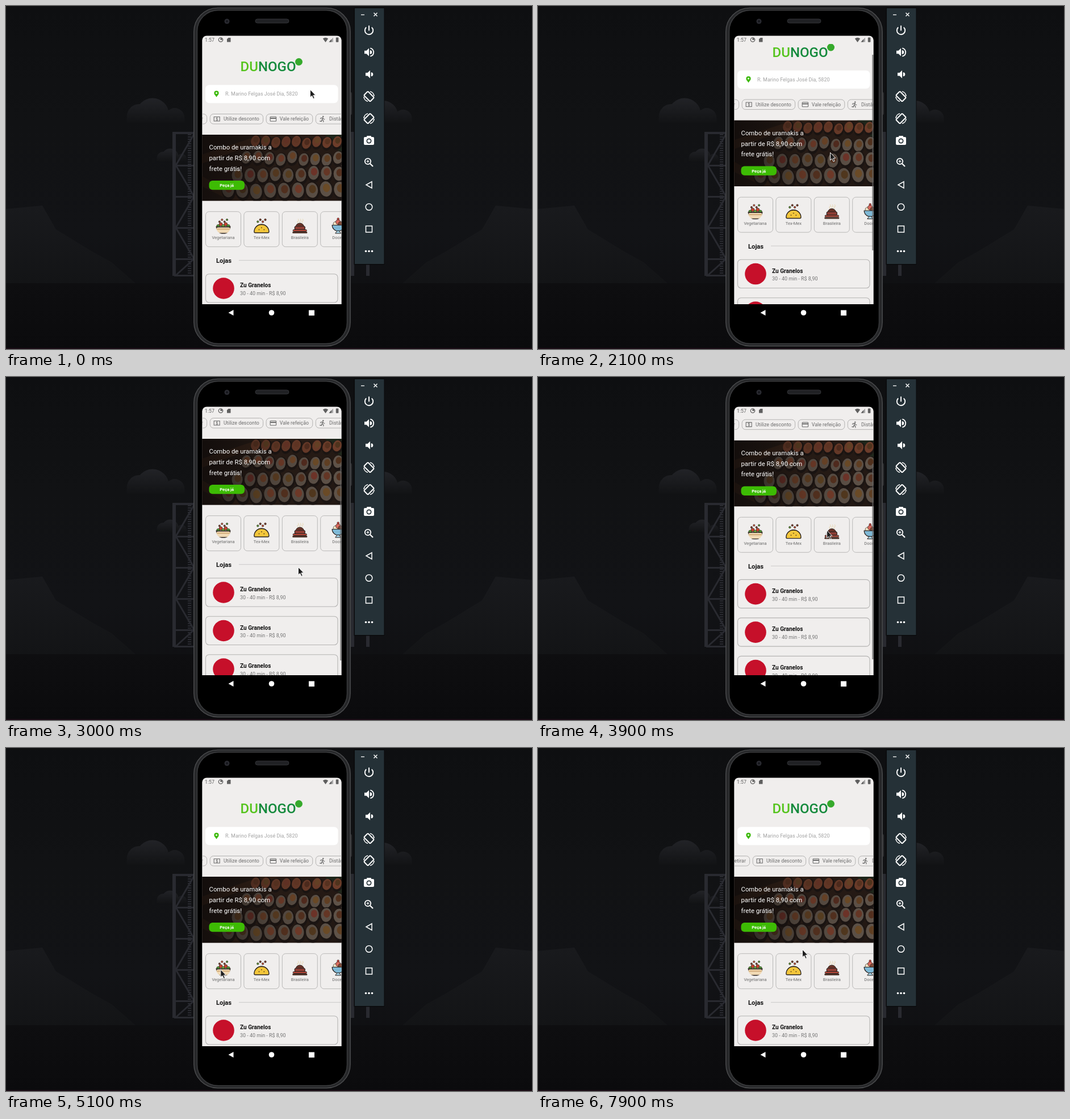
Write an HTML page with a canvas that moves like this. It is 926 px wide and 605 px high and loops after 8 s.

```html
<!DOCTYPE html>
<html lang="pt-BR">
<head>
<meta charset="utf-8">
<title>App de entregas</title>
<style>
html, body { margin: 0; width: 100%; height: 100%; overflow: hidden; background: #0f1012; }
canvas { display: block; }
</style>
</head>
<body>
<canvas id="stage" width="926" height="605"></canvas>
<script>
const W = 926, H = 605, LOOP = 8000, STEP = 100;
const PI = Math.PI;
const main = document.getElementById('stage').getContext('2d');
let g = main;

// ---- motion ----
const ramp = (t, from, to) => Math.min(1, Math.max(0, (t - from) / (to - from)));
const smooth = k => k * k * (3 - 2 * k);

// A slow drag that flings to the end, then a steady drag back
const scrollAt = t => 118 * (ramp(t, 1500, 2500) ** 3 - ramp(t, 3888, 4427));
const chipShiftAt = t => 67 - 67 * ramp(t, 5300, 5700) + 78 * ramp(t, 6200, 6600) - 30 * ramp(t, 7100, 7500);
const barAlphaAt = t => ramp(t, 1500, 1600) - ramp(t, 4700, 5000);

// Pointer stops: arrival time, x, y
const stops = [
  [0, 535, 147], [300, 534, 128], [500, 534, 128], [600, 475, 138], [900, 422, 158],
  [1300, 560, 255], [1600, 520, 270], [2100, 514, 258], [2400, 514, 172], [3000, 514, 335],
  [3400, 508, 266], [3900, 508, 270], [4300, 501, 352], [5000, 362, 425], [5400, 460, 203],
  [5700, 523, 203], [6100, 545, 197], [7000, 463, 198], [7900, 465, 355]
];
function pointerAt(t) {
  const i = stops.findIndex(s => s[0] > t);
  if (i < 0) return stops[stops.length - 1].slice(1);
  const [t0, x0, y0] = stops[i - 1], [t1, x1, y1] = stops[i];
  const k = smooth(ramp(t, t0, t1));
  return [x0 + (x1 - x0) * k, y0 + (y1 - y0) * k];
}

// ---- drawing helpers ----
function seeded(seed) {
  return () => (seed = (seed * 16807) % 2147483647) / 2147483647;
}
function paint(fill, stroke, width = 1) {
  if (fill) { g.fillStyle = fill; g.fill(); }
  if (stroke) { g.strokeStyle = stroke; g.lineWidth = width; g.stroke(); }
}
function rect(x, y, w, h, fill) {
  g.fillStyle = fill; g.fillRect(x, y, w, h);
}
function box(x, y, w, h, r, fill, stroke, width) {
  g.beginPath(); g.roundRect(x, y, w, h, r); paint(fill, stroke, width);
}
function disc(x, y, r, fill, stroke, width) {
  g.beginPath(); g.arc(x, y, r, 0, 2 * PI); paint(fill, stroke, width);
}
function arc(x, y, r, a, b, fill, stroke, width) {
  g.beginPath(); g.arc(x, y, r, a, b); paint(fill, stroke, width);
}
function oval(x, y, rx, ry, turn, fill) {
  g.beginPath(); g.ellipse(x, y, rx, ry, turn, 0, 2 * PI); paint(fill);
}
function path(pts) {
  g.beginPath();
  for (let i = 0; i < pts.length; i += 2) g.lineTo(pts[i], pts[i + 1]);
}
function poly(pts, fill, stroke, width) {
  path(pts); g.closePath(); paint(fill, stroke, width);
}
function line(pts, color, width) {
  path(pts); paint(null, color, width);
}
function text(str, x, y, size, color, weight = 400, align = 'left') {
  g.font = `${weight} ${size}px Roboto, sans-serif`;
  g.textAlign = align;
  g.fillStyle = color;
  g.fillText(str, x, y);
}
function fade(x0, y0, x1, y1, ...colors) {
  const f = g.createLinearGradient(x0, y0, x1, y1);
  colors.forEach((c, i) => f.addColorStop(i / (colors.length - 1), c));
  return f;
}
function local(x, y, fn, flip = 1) {
  g.save(); g.translate(x, y); g.scale(flip, 1); fn(); g.restore();
}

// ---- still parts ----
function cloud(x, base, r) {
  const fill = fade(0, base - 1.5 * r, 0, base, '#222327', '#121315');
  for (const side of [0, -0.8, 1.35]) {
    const s = r * (1 - Math.abs(side) * 0.3);
    arc(x + side * r, base - s / 2, s, PI, 0);
    g.lineTo(x + side * r + s, base); g.lineTo(x + side * r - s, base);
    paint(fill);
  }
}

function tower(steel) {
  rect(293, 222, 6, 254, steel);
  rect(293, 222, 40, 4, steel);
  for (let y = 226; y < 474; y += 4) rect(320, y, 6, 2, steel);
  for (let k = 0; k < 5; k++) {
    const y = 226 + k * 55, end = Math.min(y + 55, 475);
    line(k % 2 ? [299, y, 331, end] : [331, y, 299, end], steel, 3);
    rect(296, end - 1, 36, 3, steel);
  }
}

function backdrop() {
  rect(0, 0, W, H, fade(0, 0, 0, H, '#0e0f11', '#111214', '#121316', '#0d0d0f'));
  cloud(258, 206, 29);
  cloud(664, 206, 26);
  cloud(289, 274, 15);
  const ridge = [0, 489, 0, 358, 64, 352, 88, 394, 150, 432, 186, 452, 228, 489];
  const hill = () => poly(ridge, fade(0, 350, 0, 489, '#191a1d', '#131416'));
  local(0, 0, hill);
  local(W, 0, hill, -1);
  rect(0, 489, W, 116, fade(0, 489, 0, H, '#0e0e10', '#0b0b0d'));
  tower('#292a30');
  rect(607, 222, 6, 254, '#292a30');
  rect(634, 456, 6, 20, '#292a30');
  rect(0, 603, W, 2, '#1a0c15');
}

function phone() {
  box(604, 152, 5, 40, 2, '#2b2c2e');
  box(604, 232, 5, 78, 2, '#2b2c2e');
  box(330.8, 3.4, 275.4, 596.4, 42, '#262729', '#4c4d4f', 1.4);
  box(336.5, 7.5, 264, 588, 37, '#000', '#3c3d3f', 1.4);
  disc(389, 27, 4.5, '#292a30');
  disc(389, 27, 2, '#15161b');
  box(439, 23, 59, 7, 3.5, '#202124', '#343539');
  poly([391.5, 541, 400.5, 536, 400.5, 546], '#fff');
  disc(467.5, 541, 4.8, '#fff');
  rect(533, 536.5, 10, 9.5, '#fff');
}

function speaker(x, y, loud) {
  poly([x - 8, y - 2.7, x - 4.5, y - 2.7, x, y - 7, x, y + 7, x - 4.5, y + 2.7, x - 8, y + 2.7], '#fff');
  arc(x + 1.7, y, 3.6, -PI / 2, PI / 2, '#fff');
  if (loud) arc(x + 1, y, 7.2, -1.4, 1.4, null, '#fff', 1.8);
}

// Tilted device with turn marks at two corners
function turnIcon() {
  for (const a of [-1.35, -1.35 + PI]) arc(0, 0, 9, a, a + 1.3, null, '#fff', 1.6);
  g.rotate(-PI / 4);
  box(-5, -7.8, 10, 15.6, 1.5, null, '#fff', 2);
}

function toolbar() {
  const w = '#fff', x = 639;
  box(612.5, 2.5, 54, 454, 1, '#0a0b0c');
  rect(614, 4, 51.5, 451, '#253137');
  line([625, 15.5, 631, 15.5], w, 1.3);
  for (const s of [-3, 3]) line([650.5 - s, 12, 650.5 + s, 18], w, 1.4);
  arc(x, 43, 7.2, -0.85, PI + 0.85, null, w, 1.9);
  line([x, 34.5, x, 43.5], w, 1.9);
  speaker(x, 81.5, true);
  speaker(x + 2, 120.5, false);
  local(x, 159.5, turnIcon);
  local(x, 198.5, turnIcon, -1);
  box(630, 231, 18, 14, 2, w);
  box(635, 229, 8, 4, 1, w);
  disc(x, 238, 4.5, '#253137');
  disc(x, 238, 2.8, w);
  disc(637, 274, 5.2, null, w, 1.8);
  line([641, 278, 646, 283], w, 2.2);
  line([634.5, 274, 639.5, 274], w, 1.2);
  line([637, 271.5, 637, 276.5], w, 1.2);
  poly([634, 315.5, 644, 309.8, 644, 321.2], null, w, 1.5);
  disc(x, 354.5, 5.8, null, w, 1.5);
  box(633.5, 388, 11, 11, 0, null, w, 1.5);
  for (const d of [-5.5, 0, 5.5]) disc(x + d, 432.5, 1.8, w);
}

// ---- app ----
function statusBar() {
  const c = '#5f5f5f';
  text('1:57', 350, 63, 8.8, c);
  disc(378, 59.5, 3.7, null, c, 1.3);
  rect(377.5, 57, 3, 3, c);
  poly([389, 58.5, 391.5, 56, 395.5, 56, 395.5, 63.5, 389, 63.5], c);
  arc(562.5, 64, 8, -PI * 0.7, -PI * 0.3);
  g.lineTo(562.5, 64); paint(c);
  poly([576, 55.5, 576, 63.5, 568.5, 63.5], '#a5a5a5');
  poly([573, 58.6, 573, 63.5, 568.5, 63.5], c);
  box(580.8, 55.6, 4.6, 8.2, 0.8, c);
}

function header() {
  text('DU', 412.5, 115, 24, '#55c41d', 500);
  text('NOGO', 444, 115, 24, '#148a3c', 500);
  disc(515.5, 98.5, 6.5, '#36aa2c');
  box(351, 139.2, 233.5, 32, 7, '#fff');
  disc(370.5, 153.6, 4.1, '#3dba0c');
  poly([366.9, 155.5, 374.1, 155.5, 370.5, 160.8], '#3dba0c');
  disc(370.5, 153.6, 1.5, '#fff');
  text('R. Marino Felgas José Dia, 5820', 386, 158.3, 8.96, '#a3a3a3');
}

const GREY = '#6c6c6c';
const chips = {
  'Pra retirar'() {
    rect(-5.5, -5, 9, 1.5, GREY);
    rect(-6, -2.5, 10, 2.5, GREY);
    box(-4.8, 0, 5, 4, 0, null, GREY, 1.2);
    line([3, 0, 3, 5], GREY, 1.2);
    line([1, 3, 6, 3], GREY, 1.2);
  },
  'Utilize desconto'() {
    box(-5, -4, 10, 7.5, 0, null, GREY, 1.1);
    text('$', 0, 2.3, 7, GREY, 700, 'center');
  },
  'Vale refeição'() {
    box(-5, -4.2, 10.5, 8, 1, null, GREY, 1.1);
    rect(-5, -2.5, 10.5, 2, GREY);
  },
  'Distância'() {
    disc(1, -4.5, 1.2, GREY);
    line([-4, 0, -3, -2, 0.5, -2.5, 2, 0, 4, 0.5], GREY, 1.1);
    line([0, -2, -1, 1.5, -2, 4, -5, 3.5], GREY, 1.4);
    line([-1, 1, 1.5, 2.5, 1.5, 5.5], GREY, 1.2);
  }
};
function chipRow(shift) {
  let x = 351 - shift;
  for (const label in chips) {
    text(label, x + 24.2, 202.4, 8.85, GREY);
    const w = g.measureText(label).width + 31;
    box(x + 0.5, 190.5, w - 0.5, 17.5, 6, null, '#b4b3b2');
    local(x + 12.5, 199.5, chips[label]);
    x += w + 5;
  }
}

// Dim tray of rolls in rows, larger towards the front
function banner() {
  const rnd = seeded(11);
  g.save();
  g.beginPath(); g.rect(345, 227, 246, 116.5); g.clip();
  rect(345, 227, 246, 117, fade(345, 227, 591, 343, '#241a15', '#3a291f', '#2b1e18'));
  poly([345, 262, 450, 227, 480, 227, 345, 278], '#4a3020');
  poly([345, 300, 420, 343, 395, 343, 345, 318], '#4a3020');
  poly([562, 227, 591, 227, 591, 262], '#273524');
  for (let row = 0; row < 4; row++) {
    const size = 9 + row * 1.1;
    for (let x = 440 - row * 16; x < 600; x += size * 2) {
      const y = 240 + row * 28 + rnd() * 5, tilt = 0.35 - row * 0.15;
      oval(x, y, size, size * 1.4, tilt, '#231b18');
      oval(x - 1, y - 2, size * 0.85, size * 1.1, tilt, row ? '#8a7a6b' : '#a0583c');
      oval(x, y - 4, size * 0.5, size * 0.6, tilt, `hsl(${8 + rnd() * 25},48%,${30 + rnd() * 18}%)`);
    }
  }
  rect(345, 227, 246, 117, fade(345, 0, 591, 0, 'rgba(14,10,9,.78)', 'rgba(14,10,9,.48)', 'rgba(14,10,9,.34)'));
  g.restore();
  ['Combo de uramakis a', 'partir de R$ 8,90 com', 'frete grátis!']
    .forEach((s, i) => text(s, 357.5, 253.2 + i * 18.8, 11.35, '#fff'));
  box(357.5, 308, 62.5, 16.3, 6, '#3dbb04');
  text('Peça já', 388.7, 319, 7.6, '#fff', 700, 'center');
}

const INK = '#2b2320';
function crumbs(y, r, colors) {
  colors.forEach((c, i) => {
    const x = (i - (colors.length - 1) / 2) * 4.4;
    disc(x, y - (i % 2) * 3.5, r, c, INK, 0.7);
  });
}
const dishes = {
  Vegetariana() {
    crumbs(-8, 1.6, ['#7c3b2a', '#d0563a', '#7c3b2a', '#4e9a35']);
    crumbs(0, 3, ['#4e9a35', '#c8452f', '#6db03e', '#c8452f', '#4e9a35']);
    arc(0, 1, 12.8, 0, PI, null);
    g.save(); g.clip();
    box(-13, 1, 26, 11.5, 4, '#f0d9b4', INK, 1.3);
    g.restore();
    line([-13, 1, 13, 1], INK, 1.4);
    line([-11, 5, 11, 5], '#c99d69', 1.5);
  },
  'Tex-Mex'() {
    crumbs(-8, 1.7, ['#5e9c35', '#7b3a26', '#c44a30', '#7b3a26']);
    arc(0, 9, 12.5, PI, 0, '#70a53a', INK, 1.2);
    box(-13, -3, 26, 14.5, [13, 13, 2, 2], '#f3c63b', INK, 1.4);
    crumbs(6, 0.6, ['#cc8f24', '#cc8f24', '#cc8f24']);
  },
  Brasileira() {
    for (const x of [-3, 1, 5]) line([x, -5, x - 1.5, -8, x + 1, -10, x, -13], '#e9dcc0', 1.2);
    arc(0, 2, 7.5, PI, 0, '#6a3328', INK, 1);
    box(-9, 0, 18, 6, 2, '#8d3d34', INK, 1.2);
    box(-12, 6, 24, 3, 1, '#c04a3b', INK, 1);
    box(-13, 9.5, 26, 3, 1, '#4d342b');
  },
  Doces() {
    crumbs(-4, 4.2, ['#f2e3c4', '#d96a5e', '#7e4b38']);
    disc(0, -13, 1.8, '#c73b34', INK, 0.6);
    arc(0, -2, 10.5, 0, PI, '#7fb9d6');
    g.closePath(); paint(null, INK, 1.2);
    poly([-1.5, 8, 1.5, 8, 5, 12.5, -5, 12.5], '#a6d2e4', INK, 1);
  }
};
function categories() {
  Object.keys(dishes).forEach((label, i) => {
    const x = 351.5 + i * 67.4, mid = x + 31;
    box(x, 362.7, 62, 62, 6, null, '#b9b8b7');
    local(mid, 388.5, dishes[label]);
    text(label, mid, 411.2, 7.5, '#6a6a6a', 400, 'center');
  });
}

function stores() {
  text('Lojas', 370, 453, 11.2, '#111', 700);
  line([410, 448.7, 591, 448.7], '#c6c5c4', 0.9);
  for (let i = 0; i < 3; i++) {
    const y = 472.7 + i * 67.5;
    box(351.5, y, 232.5, 50.3, 6, null, '#b5b4b3', 1.1);
    disc(383, y + 25.3, 18.8, '#c6102a');
    text('Zu Granelos', 412, y + 23.6, 10.05, '#111', 700);
    text('30 - 40 min - R$ 8,90', 412, y + 37.2, 8.93, '#747474');
  }
}

function pointer() {
  g.lineJoin = 'round';
  poly([0.5, 0.5, 0.5, 14, 3.6, 11.3, 6, 16.5, 8.2, 15.5, 5.9, 10.5, 9.8, 10.2], '#1d1d1d', '#f4f4f4', 1);
}

const still = document.createElement('canvas');
still.width = W;
still.height = H;
g = still.getContext('2d');
backdrop();
phone();
toolbar();
g = main;

function draw(t) {
  const scroll = scrollAt(t);
  g.drawImage(still, 0, 0);
  g.save();
  box(345.3, 52.4, 245.4, 473.6, [8, 8, 0, 0], '#f0eeed');
  g.clip();
  statusBar();
  g.beginPath(); g.rect(345, 67, 246, 459); g.clip();
  local(0, -scroll, () => {
    header();
    chipRow(chipShiftAt(t));
    banner();
    categories();
    stores();
  });
  rect(588.3, 67 + scroll * 0.745, 2.4, 345, `rgba(95,95,95,${0.75 * barAlphaAt(t)})`);
  g.restore();
  local(...pointerAt(t), pointer);
}

const start = performance.now();
function tick() {
  const t = (performance.now() - start) % LOOP;
  draw(Math.floor(t / STEP) * STEP);
  requestAnimationFrame(tick);
}
tick();
</script>
</body>
</html>
```
